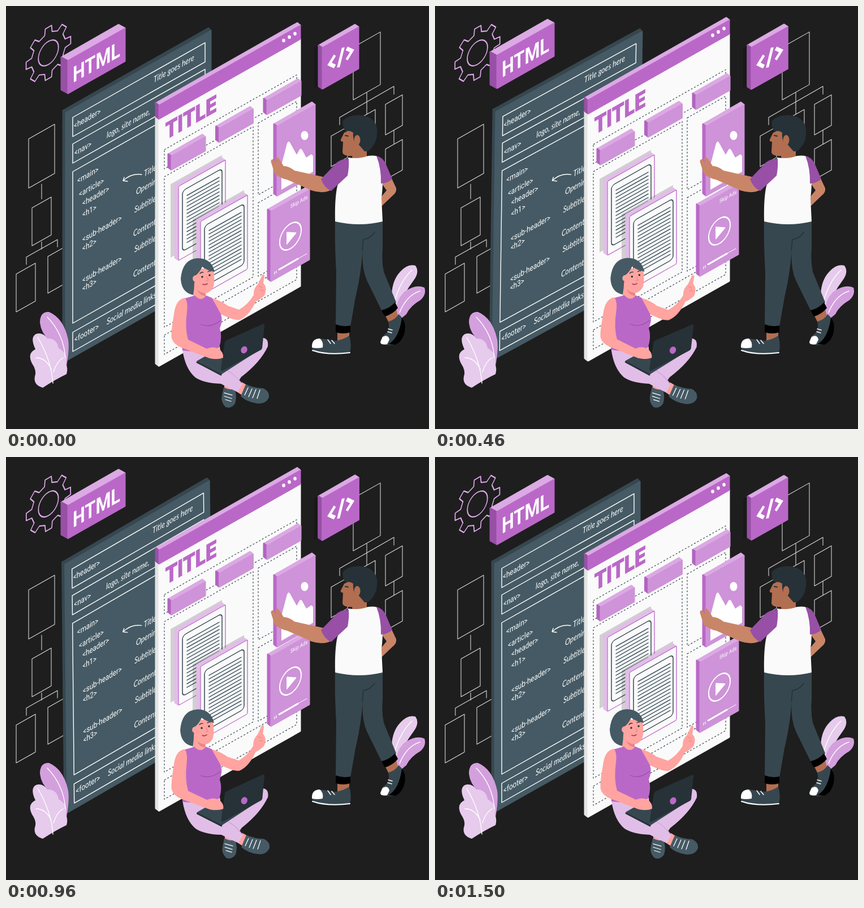
An HTML page that plays this animation: 748x748 px, repeating every 1540 ms.

```html
<!DOCTYPE html>
<html lang="en">
<head>
<meta charset="utf-8">
<title>Building a web page</title>
<style>
html, body { margin: 0; width: 100%; height: 100%; overflow: hidden; background: #1e1e1e }
svg { display: block; width: 100%; height: 100% }
text { font-family: Roboto, sans-serif; fill: #fff }
.hand { font-family: Lato, sans-serif; font-style: italic }
.line { fill: none; stroke-linecap: round; stroke-linejoin: round }
</style>
</head>
<body>
<svg id="stage" viewBox="0 0 748 748"></svg>
<script>
const SLOPE = .565;
const PURPLE = '#ba68c8', LILAC = '#ce93d8', PALE = '#e1bee7', PLUM = '#9750a5', SHEEN = '#dba9e3';
const LEAF = '#e6cbec', LEAF_BACK = '#d3a0dd';
const DARK = '#37474f', SLATE = '#455a64', INK = '#263238', WHITE = '#fafafa';
const PINK = '#ffa4a0', TAN = '#c98568', BROWN = '#b26e50';

const fill = (d, color, extra = '') => `<path d="${d}" fill="${color}" ${extra}/>`;
const line = (d, color = '#fff', width = 1.4, extra = '') =>
  `<path class="line" d="${d}" stroke="${color}" stroke-width="${width}" ${extra}/>`;
const group = (id, ...parts) => `<g id="${id}">${parts.join('')}</g>`;

// Parallelogram standing on the isometric wall, from its top left corner
const quad = (x, y, w, h) => `M${x} ${y}l${w} ${-SLOPE * w}v${h}l${-w} ${SLOPE * w}z`;
const dashed = (...q) => line(quad(...q), DARK, 1.2, 'stroke-dasharray="3 3.2" style="stroke-linecap:butt"');
const shadow = (...q) => fill(quad(...q), '#000', 'opacity=".17"');
const rounded = (d, color) => fill(d, color, `stroke="${color}" stroke-width="3" stroke-linejoin="round"`);
const frame = (x, y, w, h, r, color, width) =>
  `<rect width="${w}" height="${h}" rx="${r}" fill="none" stroke="${color}" stroke-width="${width}"
    transform="matrix(1 ${-SLOPE} 0 1 ${x} ${y})"/>`;

// Slab with a front, a top and a left face
function slab(x, y, w, h, [front, top, side], dx = 6, dy = 4) {
  const rise = SLOPE * w;
  return rounded(`M${x - dx + 1} ${y - dy + 1}l${w - 1} ${-rise}l${dx - 1} ${dy}L${x} ${y}z`, top) +
    rounded(`M${x - dx + 1} ${y - dy + 1}L${x} ${y + 1}v${h - 2}l${1 - dx} ${-dy}z`, side) +
    rounded(quad(x + 1, y + 1, w - 2, h - 2), front);
}

const label = (text, x, y, size = 14.5, attrs = '') =>
  `<text transform="matrix(.8 -.452 0 1 ${x} ${y})" font-size="${size}" ${attrs}>${text}</text>`;
const tag = (name, x, y) => label(`&lt;${name}&gt;`, x, y);
const note = (text, x, y) => label(text, x, y, 15, 'class="hand"');

function gear() {
  let d = '';
  for (let i = 0; i < 8; i++)
    for (const [r, a] of [[35, -.22], [46, -.14], [46, .14], [35, .22]]) {
      const t = i * Math.PI / 4 + a;
      d += `${d ? 'L' : 'M'}${(r * Math.cos(t)).toFixed(1)} ${(r * Math.sin(t)).toFixed(1)}`;
    }
  return `<g transform="matrix(.866 -.5 0 1 75 83)">${line(d + 'z', '#e2a9ee', 2)}
    <circle r="20.5" fill="none" stroke="#e2a9ee" stroke-width="2"/></g>`;
}

const wires = line([
  quad(40, 235, 46, 87), 'M63 315v26', quad(46, 357, 34, 67), 'M63 417v13M36 457v-13l55-31v13',
  quad(18, 474, 34, 67), quad(74, 443, 34, 65),
  quad(614, 73, 48, 93), 'M638 153v38M590 210v-13l96-55v14', quad(671, 174, 30, 54),
  'M686 219v25', quad(671, 253, 30, 54), quad(575, 230, 29, 54), quad(623, 200, 30, 54)
].join(''), '#d8d8d8', 1.1);

const plants =
  fill('M104 652Q113 610 110 590Q102 552 76 541Q60 540 60 560Q62 578 76 590Q92 606 94 652Z', LEAF_BACK) +
  fill('M65 675Q48 670 51 655Q55 645 46 632Q37 614 52 607Q42 586 53 580Q64 576 74 588Q90 588 93 605Q110 614 106 632Q110 642 107 651Q88 660 65 675Z', LEAF) +
  line('M73 550Q102 580 105 622M56 586Q80 626 83 667M53 622Q70 622 80 642M101 622Q90 628 84 647') +
  fill('M683 530Q678 490 697 470Q710 455 724 459Q732 470 721 485Q712 497 706 508Q695 520 690 548Z', LEAF) +
  fill('M690 545Q688 520 705 505Q725 491 740 498Q744 510 733 520Q715 530 708 545Q702 550 697 554Z', LEAF_BACK) +
  line('M718 467Q698 485 687 522M732 504Q708 512 696 542');

const codeBoard = group('code',
  slab(105, 188, 258, 440, [SLATE, DARK, DARK], 5),
  line([[197, 34], [244, 34], [293, 268], [577, 34]].map(([y, h]) => quad(118, y, 234, h)).join('')),
  ...[['header', 120, 217], ['nav', 121, 265], ['main', 126, 314], ['article', 129, 338],
    ['header', 135, 354], ['h1', 135, 374], ['sub-header', 135, 418], ['h2', 135, 434],
    ['sub-header', 135, 490], ['h3', 135, 505], ['footer', 121, 595]].map(t => tag(...t)),
  ...[['Title goes here', 261, 136], ['logo, site name,', 178, 234], ['Title', 244, 302],
    ['Opening', 230, 334], ['Subtitle', 227, 366], ['Content', 225, 408],
    ['Subtitle', 227, 436], ['Content', 225, 480], ['Social media links', 178, 564]].map(t => note(...t)),
  line('M240 298Q222 295 207 309M209 303l-2 6l8 1'));

const button = i => slab(292 + 84.5 * i, 265 - 49 * i, 61, 25, [LILAC, SHEEN, '#b164bf']);

function article(x, y) {
  let rows = '';
  for (let i = 0; i < 14; i++) rows += `M${x + 15} ${y + 16 + 6.4 * i}l57 -32`;
  return shadow(x - 14, y - 4, 91, 130) +
    slab(x, y, 83, 131, [WHITE, PALE, PALE], 7) +
    frame(x, y, 83, 131, 2, PURPLE, 1.3) +
    frame(x + 7, y + 8, 70, 107, 6, DARK, 1.5) + line(rows, SLATE, 1.5);
}

const video = slab(468, 363, 69, 124, [LILAC, SHEEN, PURPLE]) +
  label('Skip Ads', 503, 358, 9.8) +
  `<g transform="matrix(.866 -.5 0 1 503 407)"><circle r="22" fill="none" stroke="#fff" stroke-width="2.4"/>
    <path d="M-7-10L11 0L-7 10z" fill="#fff" stroke="#fff" stroke-width="2" stroke-linejoin="round"/></g>` +
  line('M475 470v4M478 468v4', '#fff', 1.2) + line('M483 466l33-19', '#fff', 3) + line('M516 447l16-9', '#fff', 1);

const browser = group('browser',
  slab(270, 199, 251, 438, [WHITE, WHITE, '#e4e4e4']),
  slab(270, 175, 251, 25, [PURPLE, SHEEN, PLUM]),
  ...[[491, 61], [501, 55], [511, 49]].map(([x, y]) => `<ellipse cx="${x}" cy="${y}" rx="2.8" ry="3.3" fill="#fff"/>`),
  label('TITLE', 281, 238, 42, `style="font-family:Inter,sans-serif;font-weight:900;letter-spacing:-1px;fill:${PURPLE}"`),
  ...[[280, 254, 234, 34], [280, 302, 157, 266], [446, 207, 68, 127], [446, 348, 68, 130], [280, 582, 234, 34]].map(q => dashed(...q)),
  ...[0, 1, 2].map(button), article(305, 319), article(344, 381), video);

const picture = slab(479, 212, 68, 124, [LILAC, SHEEN, PURPLE]) +
  '<ellipse cx="528" cy="229" rx="6.5" ry="8" fill="#fff"/>' +
  fill('M487 281L497 243Q500 236 503 243L514 263L519 254Q522 250 525 257L531 268L540 262L543 265V293L487 325Z', '#fff');

const sign = group('sign', slab(109, 96, 102, 59, [PURPLE, SHEEN, PLUM], 12, 6),
  label('HTML', 118, 136, 38.5, 'font-weight="700"'));

const icon = group('icon', shadow(545, 74, 65, 72), slab(559, 73, 65, 74, [PURPLE, SHEEN, PLUM], 7),
  '<g transform="matrix(.866 -.5 0 1 592 91)"><path d="M-12-10L-23 0L-12 10M5-15L-5 15M12-10L23 0L12 10" fill="none" stroke="#fff" stroke-width="6"/></g>');

const man =
  fill('M681 303L690 322Q691 330 684 335L662 356L663 338L673 326L663 312Z', TAN) +
  // shoes and legs
  fill('M586 572H607V590L586 594ZM670 546L690 536L694 552L678 562Z', BROWN) +
  fill('M582 592Q597 590 607 583Q612 600 608 613Q580 618 552 614Q540 610 541 600Q543 588 555 588Q570 590 582 592Z', DARK) +
  fill('M541 602Q541 588 555 588Q562 594 560 604Q550 606 541 604Z', '#fff') +
  line('M542 609Q570 618 608 613', '#fff', 2) + line('M569 590l5 7M576 591l5 6', '#fff', 1.5) +
  fill('M676 558Q690 554 694 545Q707 555 705 570Q703 590 690 598Q675 602 664 597Q660 590 668 582Q680 575 676 558Z', DARK) +
  fill('M700 551Q708 560 705 576Q702 592 689 599L676 598Q695 588 700 551Z', '#000') +
  fill('M666 585Q676 580 678 590L674 598Q662 600 662 594Z', '#fff') + line('M676 571l7 2M675 576l7 2', '#fff', 1.5) +
  fill('M582 378H666L666 430Q664 450 668 470L690 524Q678 537 665 540L638 485Q628 462 631 425Q629 470 618 515L609 567Q596 571 583 566L584 470Q581 420 582 378Z', DARK) +
  line('M652 400Q646 410 632 413L630 432', INK, 1.5) +
  fill('M583 563Q596 568 609 565V577Q596 581 583 577ZM664 538Q678 535 688 524L693 534Q684 545 670 549Z', '#000') +
  // torso and head
  fill('M598 224L592 236Q591 240 596 240L595 259Q597 266 612 265L613 273Q627 274 638 267V240L612 218Z', BROWN) +
  fill('M605 268Q625 271 640 265Q655 263 661 268Q669 300 664 340L666 381Q625 391 582 381Q581 340 586 318Q600 290 605 268Z', WHITE) +
  fill('M655 265Q666 267 672 280L683 306Q675 313 663 314Q664 288 655 265Z', PLUM) +
  fill('M560 302L510 291Q500 283 491 283L482 269Q477 266 476 272L481 283L473 271Q467 271 469 277L475 296Q485 305 497 307L540 326Q560 333 576 325Z', TAN) +
  fill('M606 270Q590 270 582 280L557 306Q563 322 575 327L604 300Q607 285 606 270Z', PLUM) +
  fill('M596 203Q606 192 625 193Q650 194 656 215Q659 242 640 257H634L622 243L616 240Q613 232 614 224Q608 219 601 222Q594 214 596 203Z', INK) +
  `<ellipse cx="621" cy="237" rx="5.5" ry="9" fill="${BROWN}"/>` + line('M600 229l5 1', INK, 2);

const woman = group('woman',
  // legs and shoes
  fill('M386 664L405 670L402 682L386 678ZM417 665L429 672L420 690L408 682Z', PINK) +
  fill('M385 674Q396 680 404 677Q409 690 405 703Q398 713 388 709Q379 700 382 688Z', SLATE) +
  fill('M424 669Q440 676 455 676Q466 681 465 692Q460 704 445 703Q425 700 415 690Z', SLATE) +
  line('M386 684l14 4M386 690l13 4M388 696l10 3M428 675l-6 13M435 677l-6 14M442 678l-6 15M449 679l-5 15', '#fff', 1.3),
  fill('M395 615L450 587Q465 585 463 602Q450 630 416 656L408 668L384 662Z', PALE),
  fill('M312 608Q345 606 378 602L382 635Q402 646 418 668L410 683Q395 676 380 668Q350 667 335 657Q317 642 312 608Z', PALE),
  line('M382 640Q403 648 417 668', LILAC, 1),
  // pointing arm
  fill('M363 516Q380 521 392 530L412 537Q428 528 438 511Q437 500 446 491L453 476Q456 472 457 478L455 490Q463 498 457 512Q448 520 442 522Q430 548 413 555Q405 556 396 552L370 541Z', PINK),
  line('M447 495l6 3M449 502l6 1', '#e98482', 1),
  // head
  fill('M336 464Q352 466 366 462Q370 482 367 496Q363 506 353 508L354 514Q345 528 331 517V490Z', PINK),
  fill('M353 508Q343 507 338 501Q342 512 353 513Z', '#e98482'),
  fill('M369 470Q363 445 338 446Q312 448 309 482Q310 507 331 511Q333 500 333 490L336 476Q343 470 347 461Q356 468 369 470Z', SLATE),
  `<circle cx="336" cy="482" r="6" fill="${PINK}"/>`,
  `<g fill="${INK}"><circle cx="347" cy="479" r="1.8"/><circle cx="360" cy="476" r="1.8"/></g>`,
  line('M343 473q3-3 6-2M357 470q3-2 5-1', INK, 1.3) + line('M355 479l3 6l-4 1', '#e98482', 1.2) + line('M348 492q4 2 8-1', '#a33c4c', 1.6),
  // torso
  fill('M316 517L334 512Q345 524 354 512L364 516Q372 530 380 545Q384 556 378 570Q383 585 377 604Q345 614 312 609Q308 570 312 545Q309 528 316 517Z', PURPLE),
  line('M345 563Q362 570 379 556', PLUM, 1.2),
  // laptop and resting arm
  fill('M337 628L353 619L400 615L453 605L380 652Z', DARK) + line('M338 630L380 652', INK, 3),
  fill('M390 591L455 562Q458 562 457 566L453 605Q452 608 449 609L383 645Q379 646 380 641L387 594Z', INK),
  `<ellipse cx="421" cy="608" rx="5.5" ry="6.5" fill="${PURPLE}" transform="rotate(25 421 608)"/>`,
  fill('M317 516Q300 518 297 545Q291 580 293 588Q296 598 310 604L360 623Q375 626 384 622Q385 612 376 606Q366 601 355 606L322 590Q316 570 320 540Q322 525 317 516Z', PINK));

const stage = document.getElementById('stage');
stage.innerHTML = [wires, group('gear', gear()), codeBoard, plants, sign, browser, picture, icon, man, woman].join('');

const LOOP = 1540, PERIOD = 1500, STEPS = 36;
const move = (id, transform) => stage.getElementById(id).setAttribute('transform', transform);
const ease = p => (1 - Math.cos(Math.PI * p)) / 2;

// Two beats, then rest
function beat(p) {
  const keys = [[0, 0], [.14, 1], [.28, 0], [.42, 1], [.7, 0], [1, 0]];
  const i = Math.max(1, keys.findIndex(([at]) => p <= at));
  const [[p0, v0], [p1, v1]] = [keys[i - 1], keys[i]];
  return v0 + (v1 - v0) * ease((p - p0) / (p1 - p0));
}

function draw(now) {
  // The motion advances at 24 steps a second
  const step = Math.floor((now % LOOP + 5) * STEPS / PERIOD);
  const p = Math.min(step, STEPS) / STEPS;
  const lift = -14.96 * (1 - Math.abs(1 - 2 * p));
  const sway = p < .25 ? 4 * p : p < .75 ? 2 - 4 * p : 4 * p - 4;
  const scale = 1 + .1 * beat(p);
  move('browser', `translate(0 ${lift})`);
  move('sign', `translate(0 ${lift})`);
  move('code', `rotate(${sway} 231 333)`);
  move('woman', `rotate(${sway} 380 578)`);
  move('gear', `rotate(${sway} 75 83)`);
  move('icon', `translate(587 89) scale(${scale}) translate(-587 -89)`);
  requestAnimationFrame(() => draw(performance.now() - start));
}
const start = performance.now();
draw(0);
</script>
</body>
</html>
```
